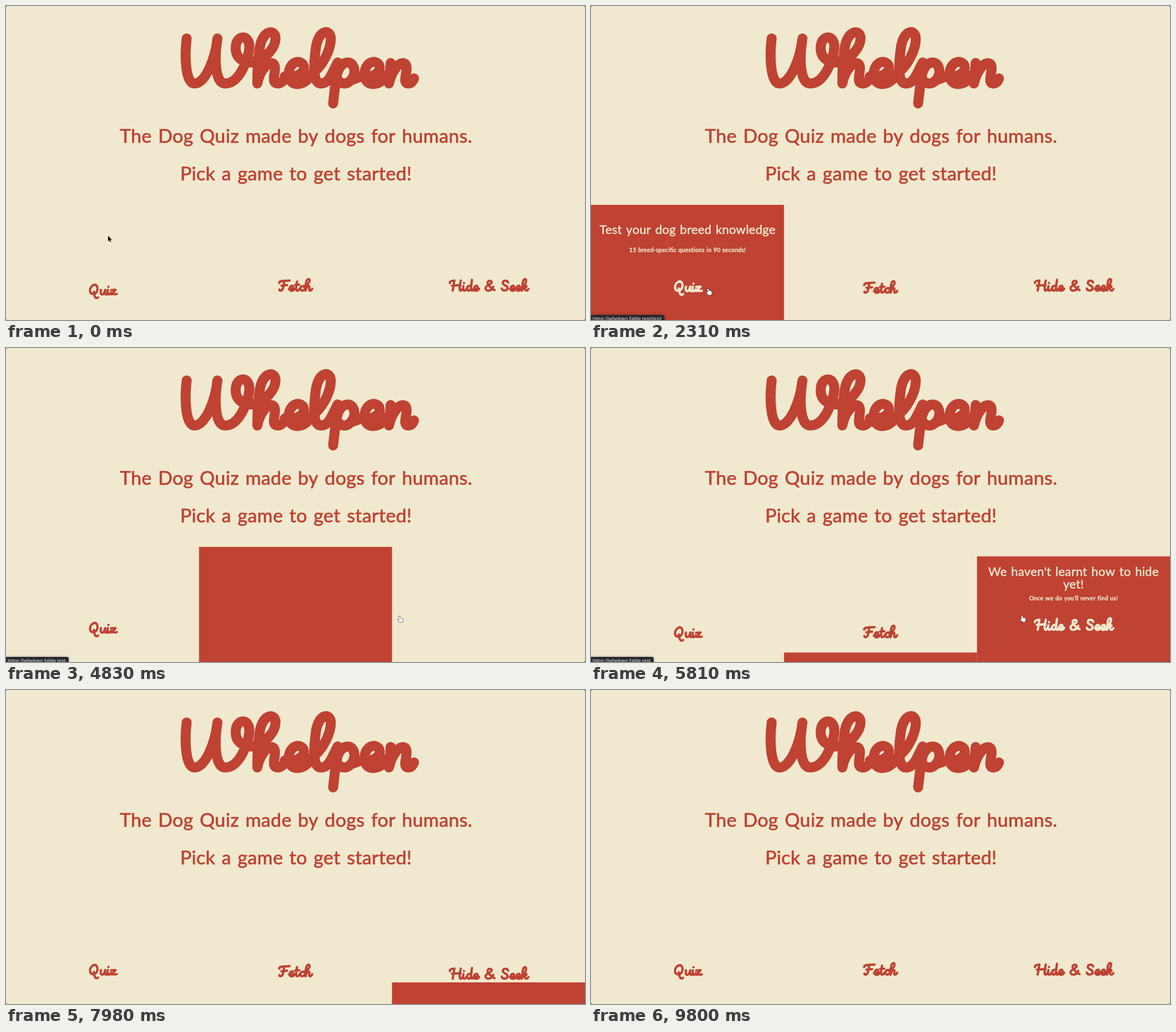
Recreate the animation shown at these times as an HTML page with a canvas. Size 1016 by 551 pixels, loop 9.87 s.

```html
<!DOCTYPE html>
<html lang="en">
<head>
<meta charset="utf-8">
<title>Whelpen</title>
<style>
  html, body { margin: 0; width: 100%; height: 100%; overflow: hidden; background: #f1e9cf; }
  canvas { display: block; width: 1016px; height: 551px; }
</style>
</head>
<body>
<canvas id="stage" width="1016" height="551" role="img"
  aria-label="Whelpen. The Dog Quiz made by dogs for humans. Pick a game to get started! Quiz, Fetch, Hide &amp; Seek"></canvas>
<script>
const ctx = document.getElementById('stage').getContext('2d');
const W = 1016, H = 551, LOOP = 9870, STEP = 70;
const RED = '#bf4232', CREAM = '#f1e9cf', PEN = 17.5;
const CARD_W = W / 3, CARD_H = 202, RISE = 1500;

// Script lettering: pen paths on a baseline at 0, each with its advance
const GLYPHS = {
  W: [130, 'M12-88C8-55 10-9 26-9C44-9 62-50 66-88C60-50 62-9 80-9C104-9 120-50 122-72C123-96 98-96 98-71C98-52 114-43 136-47'],
  h: [53, 'M-5-46C24-52 38-74 38-89C37-104 18-104 11-76C7-55 6-30 6-9C11-34 27-50 35-43C42-34 27-9 42-9C49-9 54-16 58-24'],
  e: [45, 'M1-21C26-18 38-31 34-41C28-52 9-48 8-25C8-2 36-3 47-24'],
  l: [36, 'M-1-23C24-38 37-70 37-88C36-105 17-104 11-74C7-45 4-9 20-9C29-9 34-16 38-24'],
  p: [52, 'M2-24L13-46C10-18 8 0 5 26M11-20C14-42 28-51 38-43C49-29 37-9 25-9C18-9 14-13 12-18M40-16L53-21'],
  n: [58, 'M9-45L6-9C12-35 27-50 35-43C42-34 27-9 40-9C45-9 48-13 50-18'],
  Q: [88, 'M50-84C22-84 8-54 11-34C16-5 52-5 66-36C76-66 60-94 36-82M40-30C46 0 48 32 74 14'],
  u: [54, 'M8-45C4-25 6-9 18-9C32-9 38-30 42-45C38-25 38-9 50-9C56-9 60-18 62-24'],
  i: [30, 'M8-45C4-25 4-9 16-9C24-9 28-16 32-24M12-69L13-69'],
  z: [50, 'M4-43L38-45L8-10C20-18 34-5 48-13'],
  F: [85, 'M10-68C12-92 50-82 92-88M50-86C46-50 42-9 22-9C16-9 12-13 12-18M28-48L72-52'],
  t: [38, 'M20-80C14-45 6-9 22-9C30-9 36-18 40-24M4-54L38-56'],
  c: [42, 'M36-38C34-50 8-47 8-24C8-3 34-5 44-24'],
  H: [106, 'M8-68C8-88 30-86 44-88C38-60 36-30 30-9M94-88C86-60 78-9 92-9C100-9 104-18 108-24M24-48L92-52'],
  d: [54, 'M38-42C28-52 7-46 7-24C7-4 29-3 37-28L45-94C38-50 32-9 46-9C52-9 56-18 60-24'],
  '&': [90, 'M82-13C50-30 22-60 28-74C36-94 66-86 58-70C50-56 11-46 11-28C11-2 58 0 72-40'],
  S: [70, 'M58-72C52-92 18-92 16-69C16-48 58-50 54-28C50-4 12-3 8-26'],
  k: [60, 'M-1-23C24-38 39-72 38-90C36-105 18-104 12-74L6-9M10-28C20-46 42-53 41-41C38-30 18-28 16-28C30-26 28-9 41-9C48-9 52-16 56-22'],
  ' ': [40, '']
};
for (const key in GLYPHS) GLYPHS[key][1] = new Path2D(GLYPHS[key][1]);

const games = [
  { name: 'Quiz', x: 145, enter: 85, leave: 2520, phase: 750, lift: 1,
    head: ['Test your dog breed knowledge'], sub: '15 breed-specific questions in 90 seconds!' },
  { name: 'Fetch', x: 477, enter: 2520, leave: 4830, phase: 1300, lift: -2,
    head: ['Fetch is coming soon!'], sub: "We're excited too!" },
  { name: 'Hide & Seek', x: 777, enter: 4830, leave: 7215, phase: 1650, lift: -5,
    head: ["We haven't learnt how to hide", 'yet!'], sub: "Once we do you'll never find us!" }
];

// time, x, y of the pointer
const route = [
  [0, 179, 403], [90, 177, 472], [350, 167, 499], [2250, 167, 499], [2520, 339, 484],
  [3150, 420, 474], [4300, 440, 474], [4830, 690, 470],
  [5350, 756, 469], [6900, 756, 469], [7215, 1022, 476]
];

const clamp = v => Math.min(1, Math.max(0, v));

// cubic-bezier(.25, .1, .25, 1)
function ease(x) {
  x = clamp(x);
  const bez = (u, a, b) => 3 * u * (1 - u) * (1 - u) * a + 3 * u * u * (1 - u) * b + u * u * u;
  let lo = 0, hi = 1;
  for (let i = 0; i < 24; i++) {
    const mid = (lo + hi) / 2;
    if (bez(mid, .25, .25) < x) lo = mid; else hi = mid;
  }
  return bez(lo, .1, 1);
}

function hump(p, start, length, size) {
  const u = (p - start) / length;
  return u > 0 && u < 1 ? Math.sin(Math.PI * u) * size : 0;
}

const isOver = (g, t) => t >= g.enter && t < g.leave;

function bob(g, t) {
  if (isOver(g, t)) return g.lift;
  const p = (t < g.enter ? t + g.phase : t - g.leave) % 2500;
  return hump(p, 590, 600, 9) + hump(p, 1700, 600, 4);
}

function script(word, x, y, scale, color) {
  ctx.save();
  ctx.translate(x, y);
  ctx.scale(scale, scale);
  ctx.lineWidth = PEN;
  ctx.lineCap = ctx.lineJoin = 'round';
  ctx.strokeStyle = color;
  for (const ch of word) {
    const [advance, path] = GLYPHS[ch];
    ctx.stroke(path);
    ctx.translate(advance, 0);
  }
  ctx.restore();
}

function text(str, x, y, size, color, weight = 400) {
  ctx.font = `${weight} ${size}px Lato, "Open Sans", sans-serif`;
  ctx.letterSpacing = size * .012 + 'px';
  ctx.wordSpacing = size * .07 + 'px';
  ctx.textAlign = 'center';
  ctx.lineJoin = 'round';
  ctx.lineWidth = size * .022;
  ctx.fillStyle = ctx.strokeStyle = color;
  ctx.fillText(str, x, y);
  ctx.strokeText(str, x, y);
}

function drawCard(g, i, t) {
  const h = CARD_H * (ease((t - g.enter) / RISE) - ease((t - g.leave) / RISE));
  if (h <= 0) return;
  ctx.fillStyle = RED;
  ctx.fillRect(i * CARD_W, H - h, CARD_W, h);
}

function drawLabel(g, i, t) {
  const over = isOver(g, t), mid = (i + .5) * CARD_W;
  if (over) {
    const two = g.head.length > 1;
    g.head.forEach((line, n) => text(line, mid, 400 + n * 22, 21.5, CREAM));
    text(g.sub, mid, two ? 443 : 432, 10.4, CREAM, 700);
  }
  script(g.name, g.x, 501.5 + bob(g, t), .225, over ? CREAM : RED);
}

function drawStatus(t) {
  if (t < 140 || t > 7560) return;
  const quiz = t < 2520;
  ctx.save();
  ctx.globalAlpha = clamp((7560 - t) / 140);
  ctx.shadowColor = 'rgba(0,0,0,.25)';
  ctx.shadowBlur = 5;
  ctx.fillStyle = '#29292c';
  ctx.beginPath();
  ctx.roundRect(-4, 542, quiz ? 133 : 114, 14, 3);
  ctx.fill();
  ctx.shadowBlur = 0;
  ctx.font = '9.2px "Liberation Sans", Arial, sans-serif';
  ctx.letterSpacing = ctx.wordSpacing = '0px';
  ctx.textAlign = 'left';
  ctx.fillStyle = '#e4e4e6';
  ctx.fillText('https://whelpen.fable.test' + (quiz ? '/quiz' : ''), 3, 551.5);
  ctx.restore();
}

const ARROW = new Path2D('M0 0V10L2.3 8L4 11.5L5.6 10.8L4 7.3H7Z');
const HAND = new Path2D('M-1.2 1Q0 0 1 1L1.8 4.2L5 4.6Q7 5 6.8 7L6 11.5H.8L-2.8 7.4Q-2.8 5.8-1.2 6.4L-.2 7Z');

function drawPointer(t) {
  const k = route.findIndex(p => p[0] > t);
  if (k < 1) return;
  const [t0, x0, y0] = route[k - 1], [t1, x1, y1] = route[k];
  const u = (t - t0) / (t1 - t0);
  const hand = games.some(g => isOver(g, t));
  ctx.save();
  ctx.translate(x0 + (x1 - x0) * u, y0 + (y1 - y0) * u);
  ctx.lineJoin = 'round';
  ctx.lineWidth = hand ? 1.1 : 1;
  ctx.strokeStyle = hand ? '#111' : '#fff';
  ctx.fillStyle = hand ? '#fff' : '#111';
  const shape = hand ? HAND : ARROW;
  ctx.stroke(shape);
  ctx.fill(shape);
  ctx.restore();
}

function drawCorners() {
  ctx.fillStyle = 'rgba(40,40,40,.6)';
  for (const x of [0, W]) for (const y of [0, H]) {
    ctx.beginPath();
    ctx.moveTo(x, y);
    ctx.lineTo(x ? x - 2 : 2, y);
    ctx.lineTo(x, y ? y - 2 : 2);
    ctx.fill();
  }
}

function draw(t) {
  ctx.fillStyle = CREAM;
  ctx.fillRect(0, 0, W, H);
  script('Whelpen', 305, 145, 1, RED);
  text('The Dog Quiz made by dogs for humans.', 509, 240, 33, RED);
  text('Pick a game to get started!', 509, 306, 33, RED);
  games.forEach((g, i) => drawCard(g, i, t));
  games.forEach((g, i) => drawLabel(g, i, t));
  drawStatus(t);
  drawPointer(t);
  drawCorners();
}

const start = performance.now();
function tick() {
  const t = (performance.now() - start) % LOOP;
  draw(Math.floor(t / STEP) * STEP);
  requestAnimationFrame(tick);
}
tick();
</script>
</body>
</html>
```
